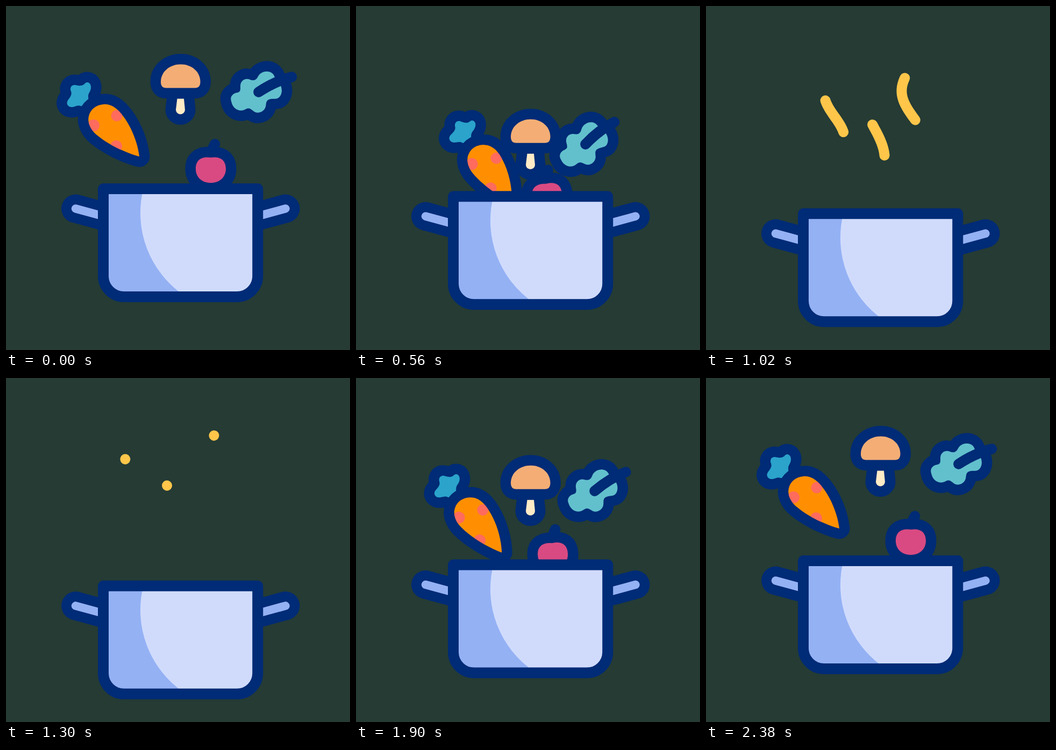
An HTML page for the animation above (2400 ms loop, 640 px wide and 640 px high).

```html
<!DOCTYPE html>
<html lang="en">
<head>
<meta charset="utf-8">
<title>Cooking pot</title>
<style>
  html, body { margin: 0; height: 100%; overflow: hidden; background: #253b34; }
  svg { display: block; width: 100vw; height: 100vh; }
  .food path { stroke: #002b76; stroke-width: 39; stroke-linejoin: round; paint-order: stroke; }
  .food .stem { stroke-width: 19.5; stroke-linecap: round; fill: none; }
  #steam path { stroke: #ffc64a; stroke-width: 19; stroke-linecap: round; fill: none; }
  .handle { stroke-linecap: round; fill: none; }
</style>
</head>
<body>
<svg viewBox="0 0 640 640">
  <defs>
    <clipPath id="above"><rect width="640" height="420"/></clipPath>
    <path id="carrotShape" d="M181 183C197 181 209 193 218 205C234 226 245 255 248 280C222 273 189 257 169 240C157 230 151 216 154 205C157 192 168 184 181 183Z"/>
    <clipPath id="carrotClip"><use href="#carrotShape"/></clipPath>
    <path id="potShape" d="M181 340H468.3V502.5A38.5 38.5 0 0 1 429.8 541H219.5A38.5 38.5 0 0 1 181 502.5Z"/>
    <path id="handles" d="M181 391L129.5 377M468.500 391L520 377"/>
  </defs>

  <g clip-path="url(#above)">
    <g id="steam"></g>
    <g class="food" id="carrot">
      <path fill="#2ba3cb" d="M157 146C154 141 149 141 146 145C141 150 134 148 129 147C122 146 118 152 121 159C123 164 120 169 116 174C110 182 116 189 124 188C130 187 133 184 139 186C147 188 154 183 154 176C153 170 152 166 155 161C158 156 159 151 157 146Z"/>
      <use href="#carrotShape" fill="#ff8f00"/>
      <g clip-path="url(#carrotClip)" fill="#ff6b5c">
        <circle cx="163" cy="222" r="11"/>
        <circle cx="206" cy="204" r="10.5"/>
        <circle cx="205" cy="261" r="11"/>
      </g>
    </g>
    <g class="food" id="leaf">
      <path fill="#62c0cd" d="M419 177C416 168 423 162 431 161C437 160 436 154 436 149C436 139 445 133 454 137C462 140 466 137 469 131C476 119 494 119 499 130C502 137 503 139 508 143C514 150 515 162 509 169C504 175 496 171 489 174C482 177 485 184 482 190C478 198 467 201 461 196C455 191 452 189 446 192C436 198 422 193 419 177Z"/>
      <path class="stem" d="M470 160Q500 140 531.5 132"/>
    </g>
    <g class="food" id="mushroom">
      <path fill="#ffebc6" d="M318.5 172.5H331L333 193A8.5 8.5 0 0 1 316 193Z"/>
      <path fill="#f4ae75" d="M298 152.500Q288 152.500 288 141C288 122 305 108.500 325 108.500S361.500 122 361.500 141Q361.500 152.500 351.500 152.500Z"/>
    </g>
    <g class="food" id="tomato">
      <path class="stem" d="M382 270L388.5 257"/>
      <path fill="#d94a82" d="M381 282C394 280 409 283 409 303C409 319 397 329 381 329S353 319 353 303C353 283 368 280 381 282Z"/>
    </g>
  </g>

  <g id="pot">
    <use href="#handles" class="handle" stroke="#002b76" stroke-width="53"/>
    <use href="#handles" class="handle" stroke="#94b1f4" stroke-width="15.5"/>
    <use href="#potShape" fill="#d0dbfc"/>
    <path fill="#94b1f4" d="M181 340H255.5A185.6 185.6 0 0 0 330.6 538H219.5A38.5 38.5 0 0 1 181 502.5Z"/>
    <use href="#potShape" fill="none" stroke="#002b76" stroke-width="20" stroke-linejoin="round"/>
  </g>
</svg>
<script>
const LOOP = 2400, TURN = 1214, REST = 2356;
const byId = id => document.getElementById(id);
const clamp = v => Math.min(1, Math.max(0, v));

function makePath(d) {
  const path = document.createElementNS('http://www.w3.org/2000/svg', 'path');
  path.setAttribute('d', d);
  return path;
}

// The carrot body is shared with its clip, so it takes its outline here.
Object.assign(byId('carrotShape').style, {
  stroke: '#002b76', strokeWidth: 39, strokeLinejoin: 'round', paintOrder: 'stroke'
});

// Each food falls along a curve while turning about its own centre.
const foods = [
  ['carrot', 192, 222, 31, 'M0 0C86 120 86 120 64 285'],
  ['leaf', 482, 156, -43, 'M0 0C-45 70 -65 150 -95 330'],
  ['mushroom', 325, 156, 0, 'M0 0V338'],
  ['tomato', 381, 305, -23, 'M0 0C-23 35 -43 80 -50 172']
].map(([id, cx, cy, turn, d]) => {
  const path = makePath(d);
  return { node: byId(id), cx, cy, turn, path, length: path.getTotalLength() };
});

// Wavy steam line; crest is the height of a rightmost point.
function makeSteam(middle, swing, crest, half, bottom, top) {
  const points = [];
  for (let i = 0; i <= 60; i++) {
    const y = bottom + (top - bottom) * i / 60;
    const x = middle + swing * Math.cos(Math.PI * (y - crest) / half);
    points.push(x.toFixed(2) + ' ' + y.toFixed(2));
  }
  const path = makePath('M' + points.join('L'));
  path.setAttribute('pathLength', 1);
  byId('steam').append(path);
  return path;
}
const steams = [
  makeSteam(239, 19, 248, 85, 381, 151),
  makeSteam(312, 20.5, 285, 120, 418, 200),
  makeSteam(390, 26, 268, 110, 396, 107)
];

// Same curve as cubic-bezier(.85, 0, .15, 1).
function ease(x) {
  let low = 0, high = 1;
  for (let i = 0; i < 24; i++) {
    const s = (low + high) / 2, r = 1 - s;
    if (2.55 * r * r * s + 0.45 * r * s * s + s ** 3 < x) low = s; else high = s;
  }
  return low * low * (3 - 2 * low);
}
const cubicInOut = u => u < 0.5 ? 4 * u ** 3 : 1 - 4 * (1 - u) ** 3;

function draw(time) {
  const fall = time < TURN
    ? ease(time / TURN)
    : 1 - ease(clamp((time - TURN) / (REST - TURN)));

  byId('pot').setAttribute('transform', `translate(0 ${47 * fall})`);
  for (const { node, cx, cy, turn, path, length } of foods) {
    const { x, y } = path.getPointAtLength(length * fall);
    node.setAttribute('transform', `translate(${x} ${y}) rotate(${turn * fall} ${cx} ${cy})`);
  }

  const head = cubicInOut(clamp((time - 525) / 700));
  const tail = cubicInOut(clamp((time - 636) / 700));
  for (const path of steams) {
    path.style.display = head - tail > 0.0005 ? '' : 'none';
    path.style.strokeDasharray = `${head - tail} 3`;
    path.style.strokeDashoffset = -tail;
  }
}

const start = performance.now();
function tick() {
  draw((performance.now() - start) % LOOP);
  requestAnimationFrame(tick);
}
tick();
</script>
</body>
</html>
```
